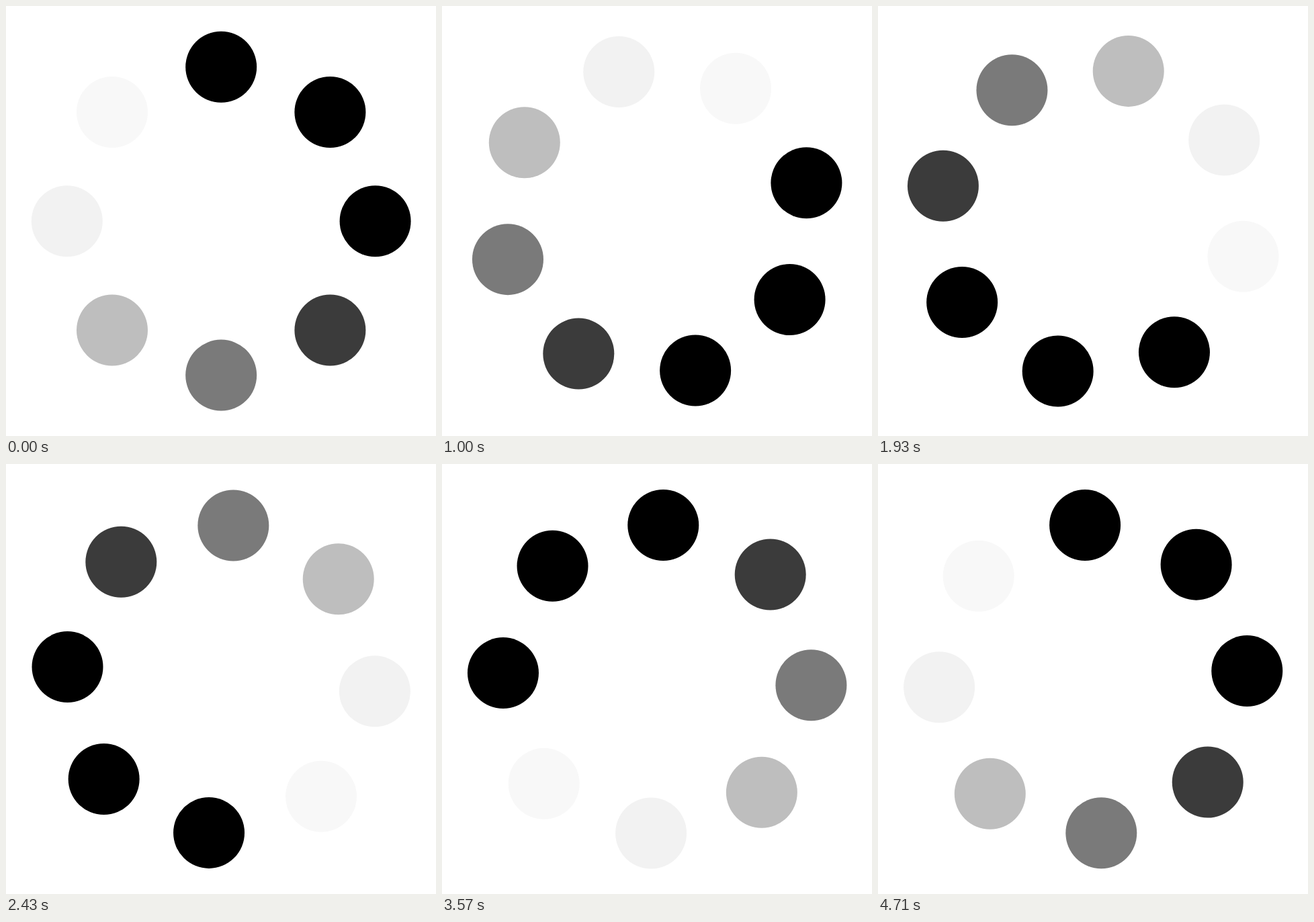
An HTML page that plays this animation: 640x640 px, repeating every 4780 ms.

```html
<!DOCTYPE html>
<html lang="en">
<head>
<meta charset="utf-8">
<title>Spinner</title>
<style>
  html, body { margin: 0; width: 100%; height: 100%; overflow: hidden; background: #fff; }
  svg { display: block; width: 100%; height: 100%; }
</style>
</head>
<body>
<svg viewBox="0 0 640 640"></svg>
<script>
const LOOP = 4780;      // ms
const POSES = 119;      // poses per turn, at 25 per second
const RATE = 14;        // pictures shown per second
const CENTER = 320.2, ORBIT = 229.4, RADIUS = 53;

// Clockwise, starting at the top.
const colors = ['#000', '#000', '#000', '#3b3b3b', '#7a7a7a', '#bebebe', '#f2f2f2', '#f8f8f8'];

const svg = document.querySelector('svg');
const dots = colors.map(fill => {
  const dot = document.createElementNS('http://www.w3.org/2000/svg', 'circle');
  dot.setAttribute('r', RADIUS);
  dot.setAttribute('fill', fill);
  return svg.appendChild(dot);
});

// Ticks fall on whole hundredths of a second; each shows the latest pose.
function turnAt(ms) {
  const hundredths = Math.floor((ms % LOOP) / 10);
  const tick = Math.ceil((hundredths + 0.5) * RATE / 100) - 1;
  return Math.floor((tick + 0.5) * 25 / RATE) / POSES;
}

function draw(ms) {
  const turn = turnAt(ms);
  dots.forEach((dot, i) => {
    const angle = (turn + i / dots.length) * 2 * Math.PI;
    dot.setAttribute('cx', (CENTER + ORBIT * Math.sin(angle)).toFixed(3));
    dot.setAttribute('cy', (CENTER - ORBIT * Math.cos(angle)).toFixed(3));
  });
}

function loop() {
  draw(performance.now());
  requestAnimationFrame(loop);
}

draw(0);
requestAnimationFrame(loop);
</script>
</body>
</html>
```
